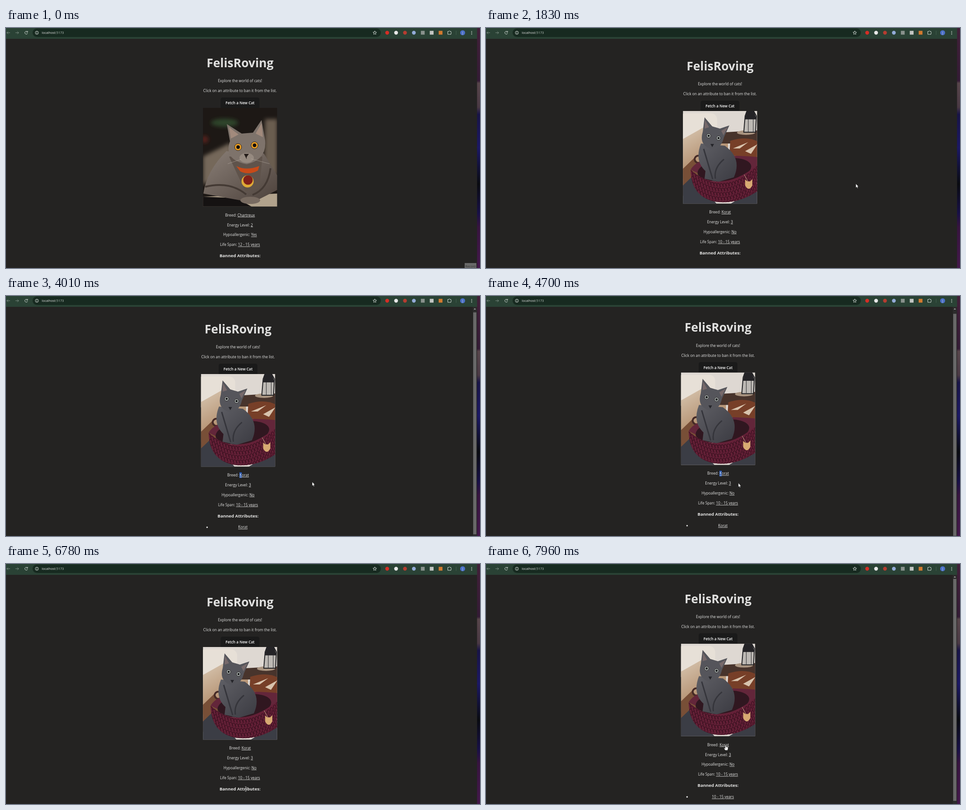
These frames come from a looping animation (1052 px wide and 532 px high, 8 s). An HTML page:

```html
<!DOCTYPE html>
<html lang="en">
<head>
<meta charset="utf-8">
<title>FelisRoving</title>
<style>
  html, body { margin: 0; width: 100%; height: 100%; overflow: hidden; background: #242322; }
  svg { display: block; width: 1052px; height: 532px; }
  text { font: 8.3px "Open Sans", "Noto Sans", sans-serif; fill: #e6e6e5; text-anchor: middle; white-space: pre; }
  .title { font-size: 26.5px; font-weight: 700; fill: #e0e0df; }
  .head { font-size: 9.6px; font-weight: 700; }
  .button { font-weight: 600; fill: #fff; }
  .link { text-decoration: underline; }
  .url { font-size: 7.3px; text-anchor: start; }
  .small { font-size: 6.2px; }
  .line { fill: none; stroke: #d5ddd8; }
  .cursor { fill: #fff; stroke: #111; stroke-width: .6; }
</style>
</head>
<body>
<svg viewBox="0 0 1052 532">
  <defs>
    <filter id="soft"><feGaussianBlur stdDeviation="4"/></filter>
    <filter id="fur"><feGaussianBlur stdDeviation=".7"/></filter>
    <linearGradient id="wallpaper" x2="0" y2="1">
      <stop stop-color="#422039"/><stop offset=".22" stop-color="#341b35"/>
      <stop offset=".23" stop-color="#57454a"/><stop offset=".33" stop-color="#4a3944"/>
      <stop offset=".36" stop-color="#181447"/><stop offset=".5" stop-color="#1b1865"/>
      <stop offset=".65" stop-color="#090b10"/><stop offset=".77" stop-color="#171047"/>
      <stop offset=".83" stop-color="#37143f"/><stop offset="1" stop-color="#44184b"/>
    </linearGradient>
    <linearGradient id="grey" x2="1" y2="1"><stop stop-color="#8b8078"/><stop offset="1" stop-color="#4b403a"/></linearGradient>
    <linearGradient id="blue" x2="1" y2="1"><stop stop-color="#5f5f65"/><stop offset="1" stop-color="#3b3b42"/></linearGradient>
    <linearGradient id="sofa" x2=".5" y2="1"><stop stop-color="#d9c8b3"/><stop offset="1" stop-color="#a67c58"/></linearGradient>
    <clipPath id="tall"><rect width="164.6" height="218.8"/></clipPath>
    <clipPath id="short"><rect width="164.6" height="205.2"/></clipPath>
    <clipPath id="wall"><path id="basket" d="M17 130Q80 188 165 120V178Q120 208 72 201 18 190 17 130"/></clipPath>
  </defs>

  <g id="intro">
    <rect id="button" x="-43" y="-23" width="86" height="30" rx="4.4" fill="#1a1a1a" stroke-width=".6"/>
    <text class="title" y="-90">FelisRoving</text>
    <text y="-56.8">Explore the world of cats!</text>
    <text y="-34.9">Click on an attribute to ban it from the list.</text>
    <text class="button" y="-7.8">Fetch a New Cat</text>
  </g>

  <g id="catA" clip-path="url(#tall)">
    <rect width="165" height="219" fill="#1d1815"/>
    <g filter="url(#soft)">
      <path d="M0 108L60 78 70 140 0 170" fill="#75685a"/>
      <path d="M138 25H165V150H135z" fill="#6b5d50"/>
      <ellipse cx="48" cy="33" rx="30" ry="9" fill="#2f4429"/>
      <circle cx="4" cy="70" r="8" fill="#57221b"/>
    </g>
    <path d="M0 197L165 190V219H0" fill="#b1a28c"/>
    <path d="M0 197L75 200 108 219H0" fill="#151212"/>
    <g filter="url(#fur)">
      <path d="M52 96Q8 140 1 190L110 210 165 182V150L135 101" fill="url(#grey)"/>
      <path d="M58 108L94 185 125 178 132 108" fill="#5f534b"/>
      <path d="M5 175Q60 162 96 192M150 134Q144 180 110 193" fill="none" stroke="#443a34" stroke-width="4"/>
      <ellipse cx="105" cy="205" rx="22" ry="8" fill="#786b61"/>
      <path d="M60 74L53 36 86 57 111 55 130 27 138 72Q142 115 97 125 45 115 60 74" fill="#7e736b"/>
      <path d="M62 68L58 43 79 59M117 57L130 34 133 65" fill="#a28a7c"/>
      <ellipse cx="97" cy="111" rx="16" ry="11" fill="#968a80"/>
    </g>
    <g id="eyesA"></g>
    <path d="M91 102H102L97 109V114" fill="#241c19"/>
    <path d="M107 113L148 124M85 114L55 124" stroke="#c2b8ad" stroke-width=".5"/>
    <path d="M74 129Q96 140 125 129L122 139Q102 150 83 141" fill="#c84a18"/>
    <circle cx="99" cy="163" r="13.5" fill="#dfaa36"/><circle cx="100" cy="160" r="10.5" fill="#802019"/>
  </g>

  <g id="catB" clip-path="url(#short)">
    <rect width="165" height="206" fill="#ded8d2"/>
    <rect x="-9" y="5" width="85" height="70" rx="14" fill="#e7e0d7"/>
    <path d="M0 62L48 35 100 48V150H0" fill="url(#sofa)"/>
    <path d="M0 128L25 104 45 130 25 182 0 188" fill="#784f37"/>
    <path d="M95 47L165 43V72H85" fill="#48342c"/>
    <path d="M105 66Q140 55 165 67V120H102" fill="#773f28"/>
    <path d="M111 83L145 69 126 83M138 89L165 74 151 95M112 99L139 103 121 110" fill="#d8c3ad"/>
    <ellipse cx="140" cy="48" rx="20" ry="5" fill="#a99480"/>
    <path d="M142 0H157L163 11 161 47H135L138 11z" fill="#bdb9b4" stroke="#202023" stroke-width="2"/>
    <path d="M142 0H157L163 18H138zM145 18V46M156 18V46" fill="#242326" stroke="#242326"/>
    <path d="M0 165L22 144 75 206H0M105 206L165 170V206" fill="#3b3d45"/>
    <circle cx="34" cy="107" r="8" fill="none" stroke="#452a26" stroke-width="4"/>
    <path d="M17 130Q40 90 165 102V142L92 166" fill="#63263a"/>
    <ellipse cx="92" cy="130" rx="60" ry="25" transform="rotate(-8 92 130)" fill="#301720"/>
    <g filter="url(#fur)">
      <path d="M40 72Q25 110 50 133L48 150 79 157 113 147Q132 105 93 77" fill="url(#blue)"/>
      <path d="M46 84L66 151M91 107Q68 126 72 150" fill="none" stroke="#35353b" stroke-width="3"/>
      <path d="M44 46L48 14 65 34 82 39 103 32 91 58Q85 85 62 84 35 75 44 46" fill="#55555b"/>
      <path d="M48 39L49 20 58 36M85 44L99 36 90 54" fill="#77696a"/>
    </g>
    <g id="eyesB"></g>
    <path d="M61 73H69L65 80" fill="#25252a"/>
    <use href="#basket" fill="#642037"/>
    <path id="knit" clip-path="url(#wall)" fill="none" stroke="#401323" stroke-width="1.5"/>
    <path d="M136 141L146 159" stroke="#c7aa8b"/>
    <path d="M138 152L143 156H149L154 151V165Q146 180 138 165" fill="#d7aa72"/>
  </g>

  <g id="details">
    <rect id="selection" x="3" y="12.7" width="5.3" height="12.5" fill="#2456b5"/>
    <text class="head" y="112.7">Banned Attributes:</text>
  </g>

  <g id="scrollbar">
    <rect x="1036" y="24" width="9" height="508" fill="#2c2c2c"/>
    <path d="M1038 30l2.5-3 2.5 3" fill="#a0a0a0"/>
    <rect id="thumb" x="1037" width="7" fill="#686868"/>
  </g>

  <g id="bar">
    <rect width="1046" height="24" fill="#2a4235"/>
    <rect x="59" y="1" width="773" height="19" rx="9.5" fill="#172a20"/>
    <path class="line" stroke-opacity=".45" d="M9 10.5H2l3-3m-3 3l3 3M21 10.5H28l-3-3m3 3l-3 3"/>
    <path class="line" d="M47.5 8.5a3.2 3.2 0 1 0 .5 3M48 6.5v2.7h-2.7M68.5 10v2.5m0-4.5v1"/>
    <circle class="line" cx="68.5" cy="10.5" r="3.5"/>
    <text class="url" x="79.3" y="13.1">localhost<tspan fill="#bdc9c1">:5173</tspan></text>
    <path class="line" id="star"/>
    <path class="line" d="M980.5 7.5h2.5q1.3-3 2.5 0h2v2q3 1.3 0 2.5v2h-7z"/>
    <path d="M999 6v9" stroke="#436050"/>
    <circle cx="1013.5" cy="10.5" r="5.5" fill="#4b70c8"/><text class="small" x="1013.5" y="12.8">J</text>
    <path d="M1033.5 7v7.6" stroke="#e0e7e2" stroke-width="1.6" stroke-dasharray="1.5"/>
  </g>
  <rect x="1045.5" width="7" height="532" fill="url(#wallpaper)"/>

  <g id="record"><rect x="1018" y="521" width="26" height="11" fill="#696969"/><text x="1031" y="531.3" style="font-size:7px;fill:#343434">Record</text></g>

  <g id="pointer">
    <circle id="press" cy="1" r="6.2" fill="#d8cf00" fill-opacity=".72"/>
    <path class="cursor" id="arrow" d="M0 0v9l2-1.8 1.4 3 1.5-.7-1.3-2.9h2.6z"/>
    <path id="beam" d="M-1.7-5h3.4M0-5v10m-1.7 0h3.4" stroke="#c9c9c9" stroke-width=".8"/>
    <path class="cursor" id="hand" d="M-1 .6q1-1.2 2 0v3.6l3.8.8q1 .4.9 1.7l-.9 5.3h-5.4l-3-4.2q0-1.4 1.4-.8l1.2 1z"/>
  </g>
</svg>
<script>
const el = id => document.getElementById(id);
const show = (node, on) => { node.style.display = on ? "" : "none"; };
const move = (node, x, y) => node.setAttribute("transform", `translate(${x} ${y})`);
const clamp = v => Math.max(0, Math.min(1, v));

function add(parent, tag, attrs, text = "") {
  const node = document.createElementNS("http://www.w3.org/2000/svg", tag);
  for (const key in attrs) node.setAttribute(key, attrs[key]);
  node.textContent = text;
  return parent.appendChild(node);
}

const facts = ["Breed: ", "Energy Level: ", "Hypoallergenic: ", "Life Span: "].map((label, i) =>
  add(add(el("details"), "text", { y: 21.8 + 21.93 * i }, label), "tspan", { class: "link" }));

const items = [0, 1].map(i => {
  const g = add(el("details"), "g", {}), y = 134.5 + 13.1 * i;
  add(g, "circle", { cx: -68.7, cy: y, r: 1.7, fill: "#e6e6e5" });
  add(g, "text", { class: "link", x: 10.7, y: y + 2.7 });
  return g;
});

function eyes(parent, x, y, dx, dy, r, color) {
  for (const i of [0, 1]) {
    const at = { cx: x + dx * i, cy: y + dy * i };
    add(parent, "circle", { ...at, r, fill: color, stroke: "#2b2523" });
    add(parent, "circle", { ...at, r: r / 2, fill: "#100e0d" });
  }
}

function knit() {
  let d = "";
  for (let row = 0; row < 6; row++)
    for (let col = 0; col < 23; col++) {
      const u = (col + row % 2 / 2) / 22;
      const x = 17 + 148 * u, y = 132 - 10 * u + 132 * u * (1 - u) + row * 10;
      d += `M${x} ${y}q5 1 4 8m-4-8q-4 4 0 8`;
    }
  el("knit").setAttribute("d", d);
}

function toolbar() {
  ["#d62d25", "#e8e8e8", "#b63c30", "#93abd8", "#89928d", "#c2c5c2", "#d37a2e"].forEach((fill, i) => {
    const x = 846 + 19.75 * i;
    add(el("bar"), "rect", { x: x - 4.2, y: 6.3, width: 8.4, height: 8.4, rx: i < 4 ? 4.2 : 0, fill });
  });
  const points = Array.from({ length: 10 }, (_, i) => {
    const a = i * Math.PI / 5, r = i % 2 ? 1.9 : 4.2;
    return `${818.5 + r * Math.sin(a)} ${10.7 - r * Math.cos(a)}`;
  });
  el("star").setAttribute("d", `M${points.join("L")}z`);
}

// time, x, y, then the cursor shape
const path = [
  [70, 1030, 526, "arrow"], [540, 520, 167, "hand"], [740, 550, 162, "arrow"],
  [880, 600, 162, "arrow"], [1160, 784.5, 350, "arrow"], [1560, 784.5, 350, "arrow"],
  [1840, 822, 345, "arrow"], [2170, 664, 240.5, "arrow"], [2500, 664, 240.5, "arrow"],
  [2860, 528, 421, "beam"], [3050, 517, 404, "beam"], [3250, 523, 407, "hand"],
  [3560, 524, 407, "arrow"], [4010, 679.5, 412, "arrow"], [4080, 679.5, 412, "arrow"],
  [4800, 541, 415, "hand"], [5170, 541, 415, "hand"], [5700, 539, 430, "beam"],
  [5840, 538, 481, "beam"], [5980, 531, 507, "hand"], [6740, 531, 508, "beam"],
  [6990, 537, 452, "beam"], [7270, 549, 473, "hand"], [7550, 549, 473, "arrow"],
  [7900, 532, 402, "hand"], [8000, 531.5, 400.5, "hand"]
];
const presses = [[540, 680], [3250, 3460], [4960, 5170], [6250, 6390], [6600, 6740], [7400, 7550]];

function banned(t) {
  if (t >= 7550) return ["10 - 15 years"];
  if (t < 3530 || t >= 6740) return [];
  if (t < 5170) return ["Korat"];
  return t < 6390 ? ["Korat", "3"] : ["3"];
}

function drawPage(t) {
  const list = banned(t), first = t < 1490;
  const scroll = t < 7000 ? 7.2 * clamp((t - 3940) / 140) : 0;
  const x = list.length ? 515 : 519.4;
  const top = first ? 177 : list.length ? 176.6 - scroll : 184;
  move(el("intro"), x, top);
  move(el("details"), x, top + (first ? 218.8 : 205.2));
  for (const id of ["catA", "catB"]) move(el(id), x - 82.3, top);
  show(el("catA"), first);
  show(el("catB"), !first);
  const values = t < 1020 ? ["Chartreux", "2", "Yes", "12 - 15 years"] : ["Korat", "3", "No", "10 - 15 years"];
  facts.forEach((fact, i) => { fact.textContent = values[i]; });
  items.forEach((item, i) => {
    show(item, i < list.length);
    item.lastChild.textContent = list[i] || "";
  });
  show(el("selection"), t >= 3530 && t < 4960);
  el("button").setAttribute("stroke", t >= 520 && t < 740 ? "#646cff" : "none");
  show(el("scrollbar"), list.length);
  el("thumb").setAttribute("y", 33 + scroll * .9);
  el("thumb").setAttribute("height", list.length > 1 ? 480 : 492);
}

function drawPointer(t) {
  show(el("record"), t < 70);
  show(el("pointer"), t >= 70);
  if (t < 70) return;
  const i = path.findIndex(p => p[0] > t) - 1;
  const [t0, x0, y0, shape] = path[i], [t1, x1, y1] = path[i + 1];
  const k = (t - t0) / (t1 - t0);
  move(el("pointer"), x0 + (x1 - x0) * k, y0 + (y1 - y0) * k);
  for (const id of ["arrow", "beam", "hand"]) show(el(id), id === shape);
  show(el("press"), presses.some(([a, b]) => t >= a && t < b));
}

function frame() {
  const t = performance.now() % 8000;
  drawPage(t);
  drawPointer(t);
  requestAnimationFrame(frame);
}

eyes(el("eyesA"), 78, 87, 36.5, -4, 7.8, "#e79c24");
eyes(el("eyesB"), 57, 55, 22, 5, 4.7, "#a7b0b0");
knit();
toolbar();
frame();
</script>
</body>
</html>
```
